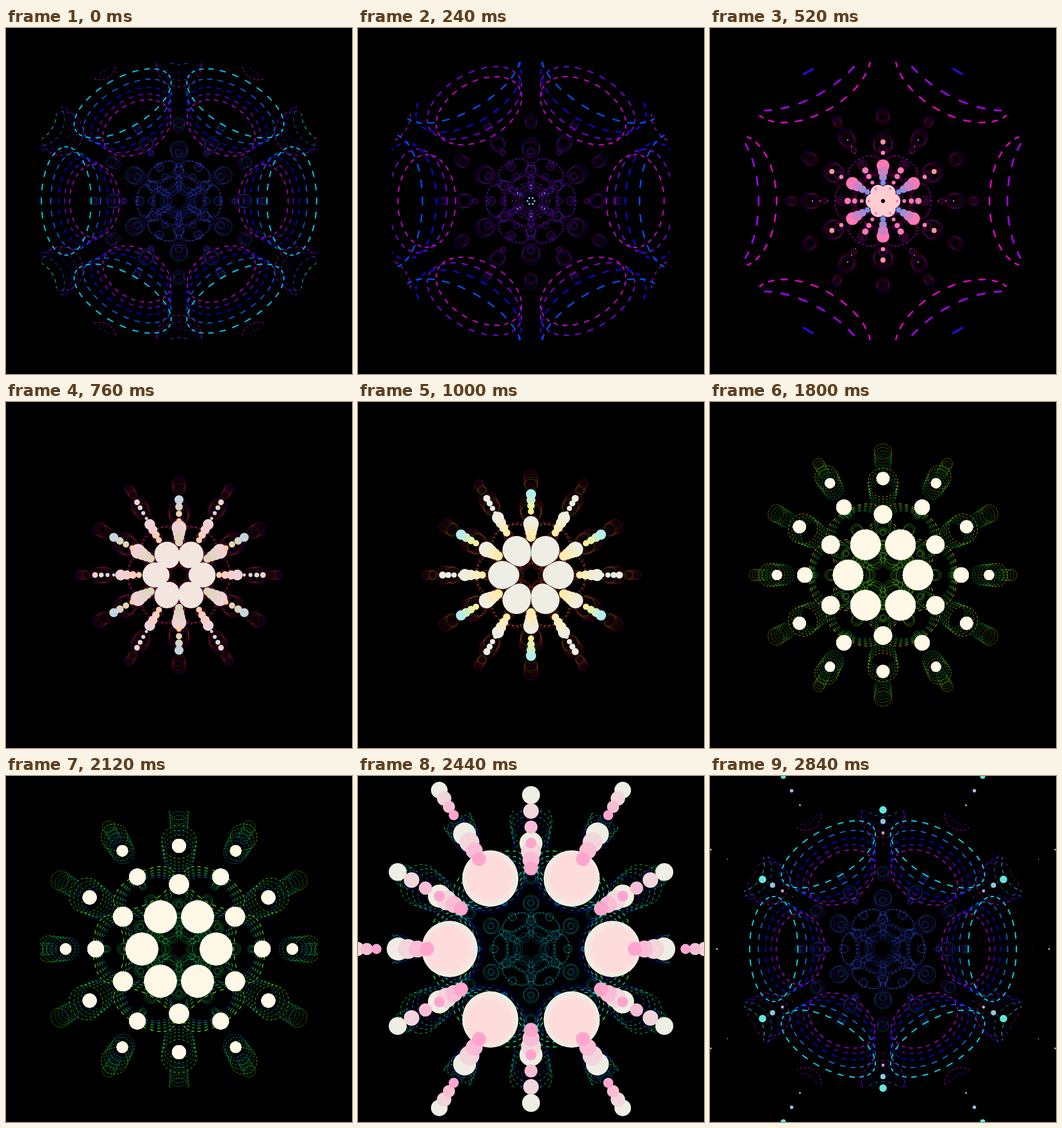
Recreate the animation shown at these times as an HTML page with a canvas. Size 540x540 px, loop 2.88 s.

```html
<!DOCTYPE html>
<html lang="en">
<head>
<meta charset="utf-8">
<title>Hexagonal dot tunnel</title>
<style>
html, body { margin: 0; width: 100%; height: 100%; overflow: hidden; background: #000; }
canvas { display: block; width: 100vmin; height: 100vmin; }
</style>
</head>
<body>
<canvas id="stage" width="540" height="540"></canvas>
<script>
const ctx = document.getElementById('stage').getContext('2d');
const LOOP = 2880, TAU = Math.PI * 2, RINGS = 5, DASHES = 24;
const lerp = (a, b, k) => a + (b - a) * k;

// Dotted tubes flying towards the camera: inner and outer reach, half width, depth.
const tubes = [
  { turn: 0, near: 60, far: 94, grow: 4, half: 37, depth: 1.438, gap: .052 },
  { turn: 30, near: 98, far: 134, grow: 0, half: 19, depth: 1.43, gap: .03 },
  { turn: 30, near: 196, far: 222, grow: 0, half: 15, depth: 1.71, gap: .03 },
  { turn: 0, near: 140, far: 172, grow: 0, half: 16, depth: 1.51, gap: .03 },
  { turn: 0, near: 240, far: 260, grow: 0, half: 11, depth: 1.87, gap: .03 }
];

// Discs: distance, radius and trail gap at each key time.
const times = [200, 520, 1000, 1480, 2120, 2440, 2840, 2880];
const cream = [255, 248, 230], ivory = [238, 238, 228];
const leadColors = [[95, 168, 224], [255, 120, 180], ivory, cream, cream, ivory, [96, 232, 220], [96, 232, 220]];
const tailColors = [[95, 168, 224], [110, 150, 225], [255, 236, 170], cream, cream, [255, 165, 205], [255, 128, 208], [255, 128, 208]];
const discs = [
  { turn: 0, dist: [4, 15, 45, 51, 58, 127, 132, 132], size: [0, 12, 22, 22, 25.5, 44, 0, 0],
    trail: [0, 1, 3, 0, 0, -1, 0, 0], shrink: .5, lead: { 1: [255, 204, 208] }, tail: { 1: [255, 204, 208], 2: ivory, 5: [255, 220, 220] } },
  { turn: 30, dist: [20, 55, 80, 88, 101, 165, 217, 222], size: [0, 10, 12, 13, 15.5, 18, 6, 0],
    trail: [4, 9, 7, 0, 0, 13, 18, 18], shrink: 1 },
  { turn: 0, dist: [25, 55, 103, 114, 130, 207, 311, 320], size: [0, 5, 9.5, 11, 13, 18, 4, 0],
    trail: [4, 11, 9, 0, 0, 15, 26, 26], shrink: 1, tail: { 1: [255, 110, 200] } },
  { turn: 30, dist: [50, 92, 126, 140, 161, 240, 340, 350], size: [0, 4, 8, 9.5, 11, 14, 2, 0],
    trail: [8, 17, 9, 0, 0, 25, 30, 30], shrink: 1, lead: { 1: [255, 144, 176], 2: [176, 236, 240] }, tail: { 1: [255, 110, 190], 2: [255, 240, 140] } },
  { turn: 0, dist: [80, 110, 138, 154, 177, 286, 400, 410], size: [0, 1.2, 5.5, 7, 9, 13, 0, 0],
    trail: [5, 12, 9, 0, 0, 15, 30, 30], shrink: 1, tail: { 2: ivory } }
];
const shrinks = [.25, .2, .13, 0, 0, .13, .3, .3];

function eachSpoke(turn, draw) {
  for (let i = 0; i < 6; i++) {
    const angle = (turn + i * 60) * Math.PI / 180;
    draw(Math.cos(angle), Math.sin(angle));
  }
}

function drawRing(tube, j, z, u) {
  const far = tube.far + j * tube.grow;
  const mid = (far + tube.near) / 2 / z, a = (far - tube.near) / 2 / z, b = tube.half / z;
  const dash = .055;
  ctx.globalAlpha = Math.min(1, Math.max(.14, .66 / z));
  ctx.strokeStyle = `hsl(${240 + 360 * u + lerp(-50, 55, j / (RINGS - 1))} 100% 47%)`;
  ctx.lineWidth = Math.max(.8, tube.half * .023 / z);
  ctx.beginPath();
  eachSpoke(tube.turn, (c, s) => {
    const point = phi => {
      const x = mid + a * Math.cos(phi), y = b * Math.sin(phi);
      return [x * c - y * s, x * s + y * c];
    };
    for (let i = 0; i < DASHES; i++) {
      const phi = i / DASHES * TAU;
      ctx.moveTo(...point(phi - dash));
      ctx.lineTo(...point(phi + dash));
    }
  });
  ctx.stroke();
}

function drawTubes(u) {
  ctx.save();
  ctx.beginPath();
  ctx.rect(-217, -217, 434, 434);
  ctx.clip();
  ctx.beginPath();
  ctx.arc(0, 0, 235, 0, TAU);
  ctx.clip();
  ctx.lineCap = 'round';
  for (let layer = 4; layer >= -1; layer--) {
    tubes.forEach((tube, index) => {
      if (layer > 2 && index > 2) return;
      for (let j = RINGS - 1; j >= 0; j--) {
        const z = tube.depth - u + layer + j * tube.gap;
        const passing = layer < 0 && j + u * 12 >= 5;
        if (z > .12 && tube.near / z < 235 && !passing) drawRing(tube, j, z, u);
      }
    });
  }
  ctx.restore();
}

function drawDiscs(t) {
  if (t < times[0]) return;
  let seg = 0;
  while (seg < times.length - 2 && t >= times[seg + 1]) seg++;
  let k = (t - times[seg]) / (times[seg + 1] - times[seg]);
  if (seg === 1) k = 1 - (1 - k) ** 2;
  if (seg === 4) k *= k;
  const at = keys => lerp(keys[seg], keys[seg + 1], k);
  const mix = (base, own = {}) => {
    const from = own[seg] || base[seg], to = own[seg + 1] || base[seg + 1];
    return from.map((v, i) => lerp(v, to[i], k));
  };
  for (const disc of discs) {
    const lead = mix(leadColors, disc.lead), tail = mix(tailColors, disc.tail);
    for (let copy = 0; copy < 4; copy++) {
      const dist = at(disc.dist) - copy * at(disc.trail);
      const radius = at(disc.size) * (1 - copy * at(shrinks) * disc.shrink);
      if (radius < .1) continue;
      ctx.fillStyle = `rgb(${lead.map((v, i) => Math.round(lerp(v, tail[i], copy / 3)))})`;
      ctx.beginPath();
      eachSpoke(disc.turn, (c, s) => {
        ctx.moveTo(dist * c + radius, dist * s);
        ctx.arc(dist * c, dist * s, radius, 0, TAU);
      });
      ctx.fill();
    }
  }
}

function frame() {
  const t = performance.now() % LOOP;
  ctx.setTransform(1, 0, 0, 1, 0, 0);
  ctx.globalAlpha = 1;
  ctx.fillStyle = '#000';
  ctx.fillRect(0, 0, 540, 540);
  ctx.translate(270, 270);
  // Just after the wrap the previous layer is still in front of the camera.
  drawTubes(t / LOOP);
  drawDiscs(t);
  requestAnimationFrame(frame);
}
frame();
</script>
</body>
</html>
```
